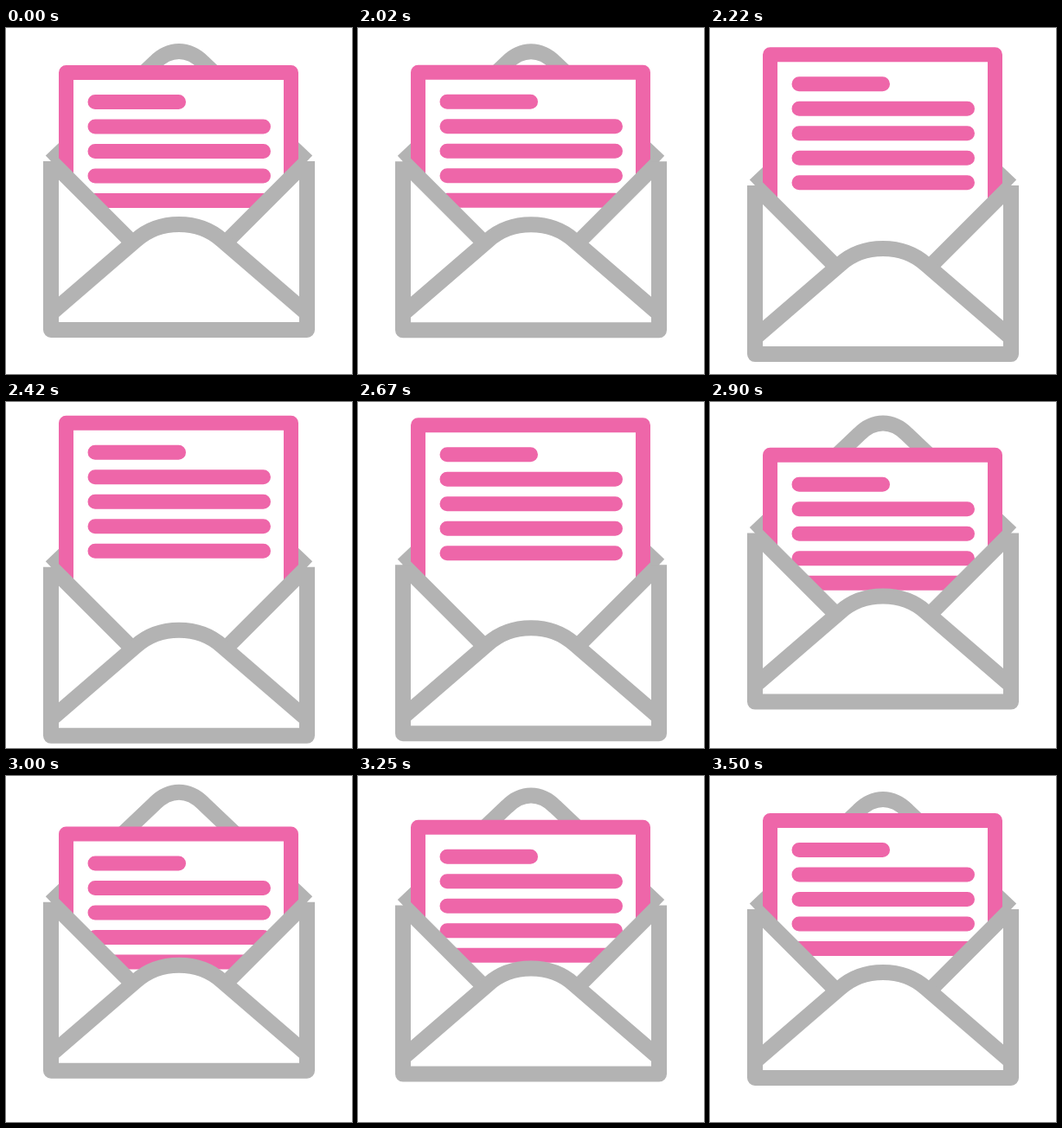
An HTML page that plays this animation: 400x400 px, repeating every 3520 ms.

```html
<!DOCTYPE html>
<html lang="en">
<head>
<meta charset="utf-8">
<title>Letter in an envelope</title>
<style>
  html, body { margin: 0; width: 100%; height: 100%; overflow: hidden; background: #fff; }
  svg { display: block; width: 100%; height: 100%; }
  path { fill: none; stroke-linejoin: round; }
  .grey { stroke: #b3b3b3; stroke-width: 18; }
  .pink { stroke: #ee66a9; stroke-width: 17; stroke-linecap: round; }
  .paper { fill: #fff; }
</style>
</head>
<body>
<svg viewBox="0 0 400 400">
  <g class="envelope">
    <path class="grey" d="M52 154L172 40C180 32 190 27 200 27S220 32 228 40L348 154"/>
  </g>
  <g class="letter">
    <path class="pink paper" d="M69.5 300V51.5H329.5V300"/>
    <path class="pink" d="M103 85.5H199.5M103 114H297.5M103 142.5H297.5M103 171H297.5M103 199.5H297.5"/>
  </g>
  <g class="envelope">
    <path class="paper" d="M52 154L145 247Q170 227 200 227T255 247L348 154V349H52Z"/>
    <path class="grey" d="M52 154L145 247M348 154L255 247"/>
    <path class="grey" d="M52 330L150 245.5C165 232 182 227 200 227S235 232 250 245.5L348 330"/>
    <path class="grey" d="M52 154V349H348V154"/>
  </g>
</svg>
<script>
const LOOP = 3520;
const envelopeParts = document.querySelectorAll('.envelope');
const letter = document.querySelector('.letter');

// Each key: time, envelope offset, letter offset, and the two easing handles leading to it.
const keys = [
  { time: 0, envelope: 0, letter: 0 },
  { time: 2000, envelope: 0, letter: 0, ease: [0.3, 0.3] },
  { time: 2520, envelope: 37.5, letter: -27.8, ease: [0.25, 0.15] },
  { time: 3085, envelope: -9.3, letter: 16.4, ease: [0.7, 0.35] },
  { time: LOOP, envelope: 0, letter: 0, ease: [0.35, 0.3] }
];

// Cubic bezier easing with flat ends: handles (x1, 0) and (x2, 1).
function bezier(x, [x1, x2]) {
  const curve = (s, a, b) => 3 * a * s * (1 - s) ** 2 + 3 * b * s * s * (1 - s) + s ** 3;
  let low = 0, high = 1;
  for (let i = 0; i < 24; i++) {
    const mid = (low + high) / 2;
    if (curve(mid, x1, x2) < x) low = mid; else high = mid;
  }
  return curve(low, 0, 1);
}

function draw() {
  const time = performance.now() % LOOP;
  const next = keys.findIndex(key => key.time > time);
  const from = keys[next - 1], to = keys[next];
  const progress = bezier((time - from.time) / (to.time - from.time), to.ease);
  const shift = part => `translate(0 ${from[part] + (to[part] - from[part]) * progress})`;
  envelopeParts.forEach(part => part.setAttribute('transform', shift('envelope')));
  letter.setAttribute('transform', shift('letter'));
  requestAnimationFrame(draw);
}
draw();
</script>
</body>
</html>
```
